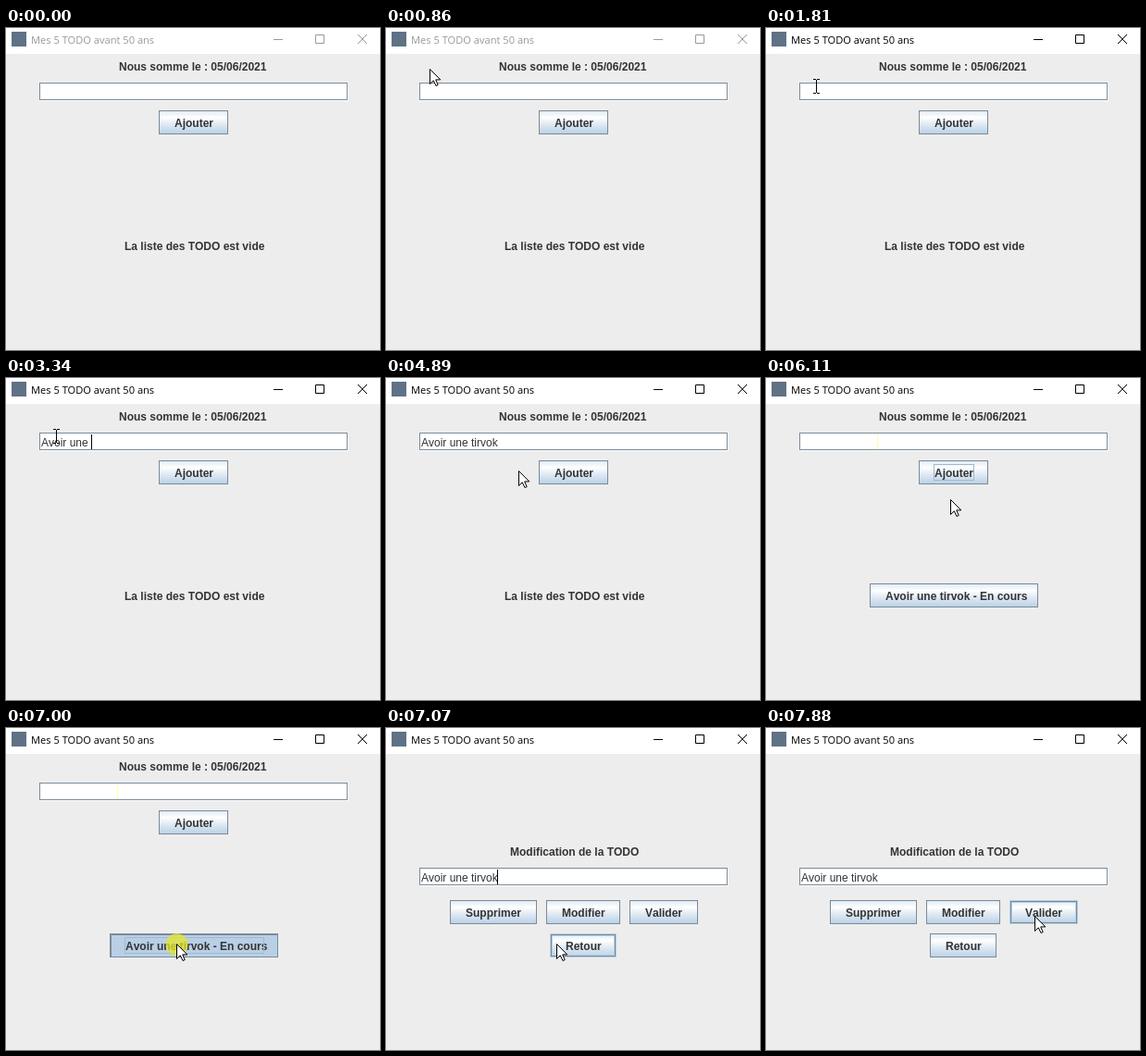
Write an HTML page that moves like this. It is 404 by 348 pixels and loops after 8000 ms.

```html
<!DOCTYPE html>
<html lang="fr">
<head>
<meta charset="utf-8">
<title>Mes 5 TODO avant 50 ans</title>
<style>
  html, body { margin: 0; width: 100%; height: 100%; overflow: hidden; background: #ededed; }
  svg { display: block; }
  text {
    font: bold 12px "Liberation Sans", Arial, sans-serif;
    font-kerning: none; font-variant-ligatures: none;
    fill: #333; white-space: pre;
  }
  .value { font-weight: normal; }
  .title { font: 11.1px "Open Sans", "Noto Sans", sans-serif; fill: #999; }
  .controls { fill: none; stroke: #999; }
  .active .title { fill: #000; }
  .active .controls { stroke: #000; }
  .face { fill: url(#metal); }
  .edge { fill: none; stroke: #7a8a99; }
  .ring { fill: none; stroke: #a3b8cc; visibility: hidden; }
  .glow { fill: none; stroke: #b8cfe5; visibility: hidden; }
  .sunk { fill: none; stroke: #7a8a99; visibility: hidden; }
  .hover .glow, .focus .ring, .down .sunk { visibility: visible; }
  .down .glow { visibility: hidden; }
  .down .face { fill: #b8cfe5; }
  .hover:not(.down) > .flat { visibility: hidden; }
</style>
</head>
<body>
<svg id="stage" width="404" height="348" viewBox="0 0 404 348">
  <defs>
    <linearGradient id="metal" x2="0" y2="1">
      <stop stop-color="#dde8f3"/>
      <stop offset=".3" stop-color="#fff"/>
      <stop offset=".6" stop-color="#dde8f3"/>
      <stop offset="1" stop-color="#b8cfe5"/>
    </linearGradient>
  </defs>
  <rect width="404" height="348" fill="#ededed"/>
  <g id="bar">
    <rect width="404" height="28" fill="#fff"/>
    <rect x="6" y="4" width="16" height="16" fill="#5f7286"/>
    <text class="title" x="27" y="17">Mes 5 TODO avant 50 ans</text>
    <path class="controls" d="M289 12.5h10M334.5 7.5h9v9h-9zM380 7l10 10M390 7l-10 10"/>
  </g>
  <g id="home"></g>
  <g id="edit"></g>
  <circle id="click" r="12" fill="#e6e628" fill-opacity=".75"/>
  <path id="arrow" fill="#fff" stroke="#000"
    d="M.5 .5V16.5L4.3 12.8L7 18.5L9.2 17.5L6.7 11.9H11.8Z"/>
  <path id="beam" fill="none" stroke="#000" d="M-3 -7.5h3m1 0h3M.5 -7v14M-3 7.5h3m1 0h3"/>
</svg>
<script>
const LOOP = 8000;
const TODO = 'Avoir une tirvok';
const KEY_TIMES = [2140, 2400, 2530, 2730, 2800, 2870, 3070, 3160, 3250, 3340,
  3490, 3540, 3740, 3840, 3940, 4160];

// Each move: first and last step time, step count, knots [step, x, y].
const MOVES = [
  [390, 660, 5, [[1, 162, 195], [3, 67, 100], [4, 48, 55], [5, 43, 33]]],
  [860, 1200, 6, [[0, 43, 33], [2, 50, 55], [4, 59, 69], [6, 54, 63]]],
  [4620, 5240, 9, [[0, 54, 63], [5, 165, 109], [6, 172, 115], [9, 197, 104]]],
  [6110, 6740, 10, [[1, 199, 131], [6, 190, 205], [10, 184, 233]]],
  [7530, 7880, 6, [[0, 184, 233], [6, 290, 203]]]
];

const $ = id => document.getElementById(id);
const show = (el, on) => { el.style.display = on ? '' : 'none'; };
const within = (t, ...spans) => spans.some(([a, b]) => t >= a && t < b);

const buttons = [];
const label = (x, y, text, id = '') => `<text id="${id}" x="${x}" y="${y}">${text}</text>`;

const box = (cls, x, y, w, h, inset) =>
  `<rect class="${cls}" x="${x + inset + .5}" y="${y + inset + .5}"
    width="${w - 1 - 2 * inset}" height="${h - 1 - 2 * inset}"/>`;

function button(id, x, y, w, text) {
  const h = 26;
  buttons.push({ id, x, y, w, h });
  return `<g id="${id}">
    <rect class="face" x="${x}" y="${y}" width="${w}" height="${h}"/>
    ${box('edge flat', x, y, w, h, 0)}
    ${box('glow', x, y, w, h, 0)}${box('glow', x, y, w, h, 2)}
    <g class="glow">${box('edge', x, y, w, h, 1)}</g>
    <path class="sunk" d="M${x + 1.5} ${y + h - 1}V${y + 1.5}H${x + w - 1}"/>
    ${label(x + 17, y + 18, text)}
    <rect class="ring" x="${x + 16.5}" y="${y + 4.5}" width="${w - 32}" height="17"/>
  </g>`;
}

const field = (id, y) => `
  <rect x="36" y="${y}" width="334" height="20" fill="#fff"/>
  <rect class="edge" x="36.5" y="${y + .5}" width="332" height="18"/>
  <text class="value" id="${id}" x="38" y="${y + 15}"></text>
  <rect id="${id}Caret" y="${y + 2}" width="1" height="16"/>`;

$('home').innerHTML = label(122, 46, 'Nous somme le : 05/06/2021') + field('entry', 59) +
  button('add', 165, 89, 75, 'Ajouter') +
  label(128, 240, 'La liste des TODO est vide', 'empty') +
  button('item', 112, 222, 182, TODO + ' - En cours');

$('edit').innerHTML = label(134, 138, 'Modification de la TODO') + field('change', 151) +
  button('remove', 69, 186, 94, 'Supprimer') +
  button('modify', 173, 186, 80, 'Modifier') +
  button('confirm', 263, 186, 74, 'Valider') +
  button('back', 177, 222, 72, 'Retour');

function pointer(t) {
  const move = MOVES.filter(m => t >= m[0]).pop();
  if (!move) return null;
  const [start, end, steps, knots] = move;
  const step = Math.min(steps, 1 + Math.floor((t - start) / (end - start) * (steps - 1)));
  const i = Math.max(1, knots.findIndex(k => k[0] >= step));
  const [a, ax, ay] = knots[i - 1], [b, bx, by] = knots[i];
  const u = (step - a) / (b - a);
  return { x: Math.round(ax + (bx - ax) * u), y: Math.round(ay + (by - ay) * u) };
}

function setField(id, text, caretOn, color = '#000') {
  const value = $(id), caret = $(id + 'Caret');
  if (value.textContent !== text) value.textContent = text;
  show(caret, caretOn);
  caret.setAttribute('fill', color);
  return { value, caret };
}

function placeCaret({ value, caret }) {
  const width = value.textContent ? value.getComputedTextLength() : 0;
  caret.setAttribute('x', 38 + Math.floor(width));
}

function render(t) {
  const editing = t >= 7070, added = t >= 5510;
  $('bar').classList.toggle('active', t >= 1350);
  show($('home'), !editing);
  show($('edit'), editing);
  show($('empty'), !added);
  show($('item'), added);

  if (editing) {
    placeCaret(setField('change', TODO, t < 7560));
  } else {
    const typed = KEY_TIMES.filter(k => t >= k).length;
    const entry = setField('entry', added ? '' : TODO.slice(0, typed),
      added || within(t, [1350, 1810], [2140, 4640], [5160, 5440]), added ? '#ffff9c' : '#000');
    if (added) entry.caret.setAttribute('x', 120);
    else placeCaret(entry);
  }

  const p = pointer(t);
  const overField = p && !editing && p.x > 36 && p.x < 370 && p.y >= 59 && p.y < 79;
  show($('arrow'), p && !overField);
  show($('beam'), overField);
  show($('click'), within(t, [5440, 5510], [6940, 7070]));
  if (p) {
    const at = `translate(${p.x} ${p.y})`;
    $('arrow').setAttribute('transform', at);
    $('beam').setAttribute('transform', at);
    $('click').setAttribute('transform', `translate(${p.x + .5} ${p.y + 1})`);
  }

  const down = { add: within(t, [5440, 5510]), item: within(t, [7000, 7070]) };
  const focus = { add: within(t, [5440, 7000]), item: down.item };
  for (const { id, x, y, w, h } of buttons) {
    const list = $(id).classList;
    list.toggle('hover', !!p && p.x > x && p.x < x + w && p.y > y && p.y < y + h);
    list.toggle('down', !!down[id]);
    list.toggle('focus', !!focus[id]);
  }
}

function tick() {
  render(performance.now() % LOOP);
  requestAnimationFrame(tick);
}
tick();
</script>
</body>
</html>
```
